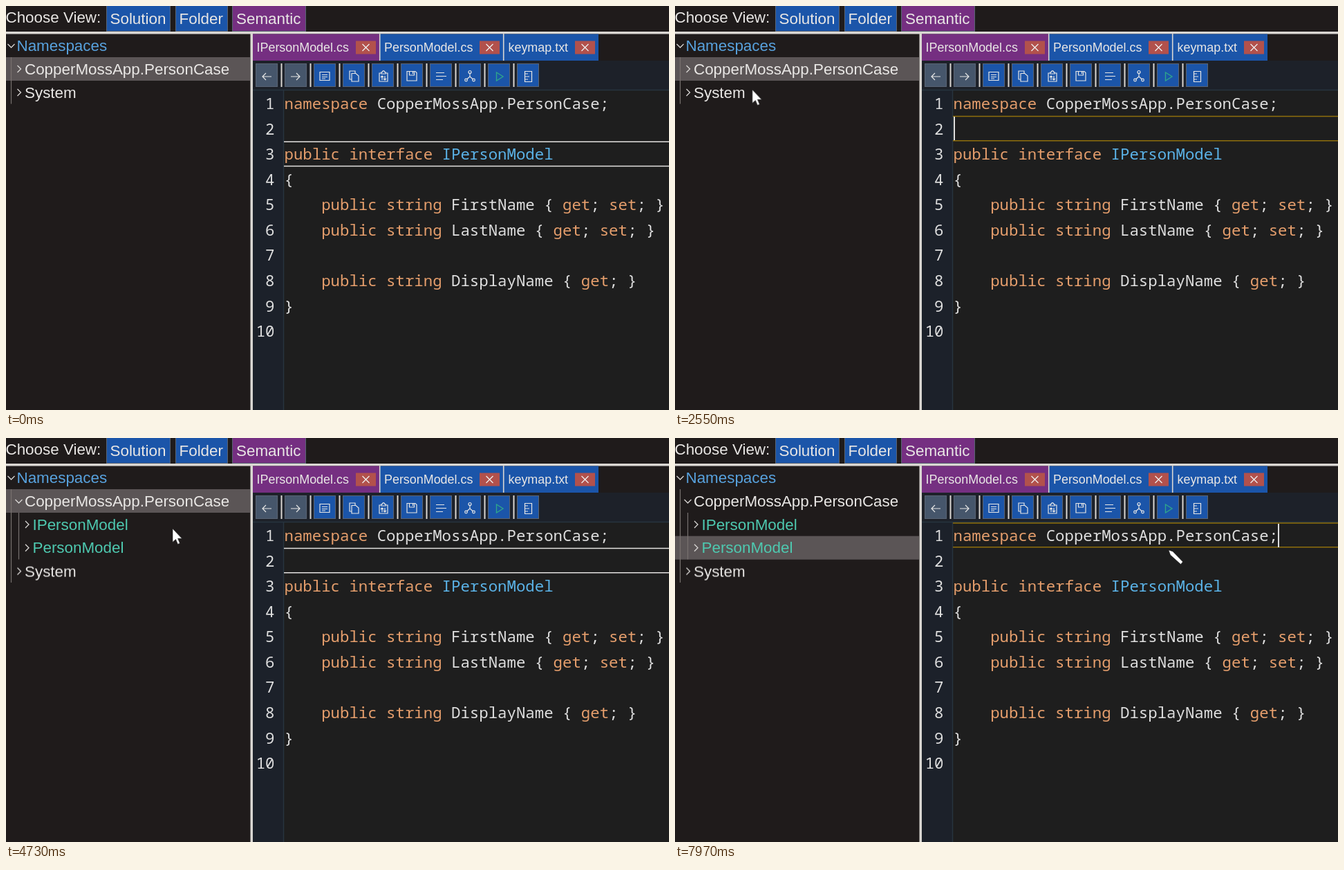
Write an HTML page that moves like this. It is 959 by 584 pixels and loops after 8000 ms.

```html
<!DOCTYPE html>
<html lang="en">
<head>
<meta charset="utf-8">
<title>Code explorer</title>
<style>
html, body { margin: 0; width: 100%; height: 100%; overflow: hidden; background: #1f1b1b; }
svg { display: block; }
text { font: 22.4px "Liberation Sans", Arial, sans-serif; fill: #e9e7e5; white-space: pre; }
.tab text { font-size: 17.92px; }
.code text { font: 22.37px "Noto Sans Mono", "DejaVu Sans Mono", monospace; fill: #dfdfdf; }
.num text { text-anchor: end; }
.code .k { fill: #e59e6c; }
.code .t { fill: #5bb3e8; }
.blue { fill: #1b55a9; }
.purple { fill: #752f81; }
.red { fill: #b2514c; }
.line { fill: none; stroke: #e4e2e0; stroke-width: 1.5; }
.guide { stroke: #77716f; stroke-width: 1.2; }
.type { fill: #4ec9b0; }

/* One loop is 8 s, so 1% is 80 ms. */
.a { animation: 8s step-end infinite; }
#closed { animation-name: closed; }
#opened { animation-name: opened; }
#system { animation-name: system; }
#row1 { animation-name: row1; }
#row2 { animation-name: row2; }
#row3 { animation-name: row3; }
#line1 { animation-name: line1; }
#line2 { animation-name: line2; }
#line3 { animation-name: line3; }
#caret { animation-name: caret; }
#pen { animation-name: pen; }
#arrow { animation-name: arrow; }
#hand { animation-name: hand; }
#ring { animation-name: ring; }
#mouse { animation: mouse 8s linear infinite; }

@keyframes closed { 0% { opacity: 1 } 42%, 100% { opacity: 0 } }
@keyframes opened { 0% { opacity: 0 } 42%, 100% { opacity: 1 } }
@keyframes system { 0% { transform: none } 42%, 100% { transform: translateY(67.6px) } }
@keyframes row1 { 0% { fill: #5b5556 } 38.5% { fill: #425b91 } 58.75% { fill: #5b5556 } 59.9%, 100% { fill: transparent } }
@keyframes row2 { 0% { fill: transparent } 59.9% { fill: #425b91 } 70.4% { fill: #5b5556 } 71.4%, 100% { fill: transparent } }
@keyframes row3 { 0% { fill: transparent } 71.4% { fill: #425b91 } 83.5%, 100% { fill: #5b5556 } }
@keyframes line1 { 0% { opacity: 0 } 83.5%, 100% { opacity: 1 } }
@keyframes line2 {
  0% { opacity: 0; stroke: #8f6f0c }
  15.9% { opacity: 1; stroke: #8f6f0c }
  38.5% { opacity: 1; stroke: #e4e2e0 }
  83.5%, 100% { opacity: 0 }
}
@keyframes line3 { 0% { opacity: 1 } 15.9%, 100% { opacity: 0 } }
@keyframes caret {
  0% { opacity: 0; transform: translate(403px, 160px) }
  15.9%, 51.2%, 63.8%, 76.3% { opacity: 1; transform: translate(403px, 160px) }
  45%, 57.5%, 70%, 82.5% { opacity: 0; transform: translate(403px, 160px) }
  83.5% { opacity: 1; transform: translate(564px, 124px) }
  94.5%, 100% { opacity: 1; transform: translate(872px, 124px) }
}
@keyframes pen { 0%, 75.6%, 100% { opacity: 1 } 20.9% { opacity: 0 } }
@keyframes arrow { 0%, 38.2%, 75.6%, 100% { opacity: 0 } 20.9%, 43.2% { opacity: 1 } }
@keyframes hand { 0%, 43.2%, 100% { opacity: 0 } 38.2% { opacity: 1 } }
@keyframes ring {
  0%, 17.5%, 42.9%, 61.4%, 73.6%, 84.2%, 96.2%, 100% { opacity: 0 }
  15.9%, 41.3%, 59.9%, 71.8%, 82.8%, 94.5% { opacity: 1 }
}
@keyframes mouse {
  0%, .7% { transform: translate(905px, 604px) }
  .9% { transform: translate(900px, 572px) }
  5% { transform: translate(760px, 330px) }
  8.6% { transform: translate(640px, 198px) }
  10.9% { transform: translate(592px, 238px) }
  14.6% { transform: translate(532px, 182px) }
  17%, 20.2% { transform: translate(515px, 177px) }
  21.6% { transform: translate(226px, 181px) }
  27.5%, 31.3% { transform: translate(121px, 123px) }
  37.5% { transform: translate(24px, 101px) }
  40%, 43% { transform: translate(22px, 102px) }
  47% { transform: translate(60px, 112px) }
  53% { transform: translate(170px, 128px) }
  58%, 61.8% { transform: translate(241px, 131px) }
  66%, 67.5% { transform: translate(228px, 145px) }
  70.5%, 73.6% { transform: translate(231.5px, 152px) }
  77.2% { transform: translate(460px, 160px) }
  81.5%, 86.5% { transform: translate(565px, 153px) }
  89.2% { transform: translate(530px, 152px) }
  93.8%, 96% { transform: translate(884px, 156px) }
  98.6% { transform: translate(878px, 159px) }
  99.5%, 100% { transform: translate(714px, 162px) }
}
</style>
</head>
<body>
<svg width="959" height="584" viewBox="0 0 959 584">
  <defs>
    <path id="right" d="M-2.5-5 2.5 0-2.5 5" fill="none" stroke="#d8d6d4" stroke-width="1.3"/>
    <path id="down" d="M-5-2.5 0 2.5 5-2.5" fill="none" stroke="#d8d6d4" stroke-width="1.3"/>
    <g id="close">
      <rect class="red" x="-14.5" y="-9.5" width="29" height="19"/>
      <path d="M-5-5 5 5M5-5-5 5" stroke="#eee" stroke-width="1.3"/>
    </g>
    <rect id="btn" x="-15.5" y="-16.5" width="31" height="33" stroke="#5a6474"/>
    <rect id="bar" x="397.5" y="83" width="2" height="34" fill="#d9d6d2"/>
  </defs>

  <rect width="959" height="584" fill="#1f1b1b"/>

  <!-- view chooser -->
  <text x="-.5" y="24">Choose View:</text>
  <g stroke="#5a6474">
    <rect class="blue" x="145.5" y="-.5" width="92" height="37"/>
    <rect class="blue" x="245.5" y="-.5" width="75" height="37"/>
    <rect class="purple" x="327.5" y="-.5" width="106" height="37"/>
  </g>
  <text x="150.5" y="26">Solution</text>
  <text x="250.5" y="26">Folder</text>
  <text x="333" y="26">Semantic</text>

  <!-- tree -->
  <g fill="transparent">
    <rect id="row1" class="a" y="74" width="353" height="34"/>
    <rect id="row2" class="a" y="108" width="353" height="33.7"/>
    <rect id="row3" class="a" y="141.7" width="353" height="34"/>
  </g>
  <use href="#down" x="7.5" y="57.5"/>
  <text x="15.5" y="65" style="fill:#58a2de">Namespaces</text>
  <text x="27" y="98.5">CopperMossApp.PersonCase</text>
  <g id="closed" class="a">
    <path class="guide" d="M7.5 74V141.5"/>
    <use href="#right" x="19" y="91"/>
  </g>
  <g id="opened" class="a">
    <path class="guide" d="M7.5 74V209M18.5 108V175.5"/>
    <use href="#down" x="18.5" y="91.5"/>
    <use href="#right" x="30.5" y="125"/>
    <use href="#right" x="30.5" y="158.7"/>
    <text class="type" x="38.5" y="132.5">IPersonModel</text>
    <text class="type" x="38.5" y="166.3">PersonModel</text>
  </g>
  <g id="system" class="a">
    <use href="#right" x="19" y="125"/>
    <text x="27" y="132.5">System</text>
  </g>

  <!-- editor panes -->
  <rect x="357" y="40" width="602" height="544" fill="#1e1e1e"/>
  <rect x="357" y="40" width="602" height="39" fill="#1f1b1b"/>
  <rect x="357" y="79" width="602" height="43" fill="#1d2129"/>
  <rect x="357" y="122" width="44" height="462" fill="#1c212a"/>
  <path d="M357 121.5H959M401.5 122V584" stroke="#27343f" stroke-width="1.5"/>
  <path d="M0 37H959V40.5H357V584H353.5V40.5H0Z" fill="#dad7d3"/>

  <!-- tabs -->
  <g class="tab">
    <rect class="purple" x="357" y="40.5" width="183" height="38.5"/>
    <rect class="blue" x="541" y="40.5" width="178" height="38.5"/>
    <rect class="blue" x="720" y="40.5" width="137" height="38.5"/>
    <path d="M540.7 40V79M719.7 40V79" stroke="#dad7d3" stroke-width="1.6"/>
    <text x="362.5" y="66">IPersonModel.cs</text>
    <text x="547" y="66">PersonModel.cs</text>
    <text x="726.5" y="66">keymap.txt</text>
    <use href="#close" x="520.5" y="60"/>
    <use href="#close" x="699.5" y="60"/>
    <use href="#close" x="837.5" y="60"/>
  </g>

  <!-- toolbar -->
  <g fill="#46566b">
    <use href="#btn" x="377" y="100"/><use href="#btn" x="419" y="100"/>
  </g>
  <g class="blue">
    <use href="#btn" x="461" y="100"/><use href="#btn" x="503" y="100"/>
    <use href="#btn" x="545" y="100"/><use href="#btn" x="587" y="100"/>
    <use href="#btn" x="629" y="100"/><use href="#btn" x="671" y="100"/>
    <use href="#btn" x="713" y="100"/><use href="#btn" x="755" y="100"/>
  </g>
  <use href="#bar"/><use href="#bar" x="42"/><use href="#bar" x="84"/>
  <use href="#bar" x="126"/><use href="#bar" x="168"/><use href="#bar" x="210"/>
  <use href="#bar" x="252"/><use href="#bar" x="294"/><use href="#bar" x="336"/>
  <g fill="none" stroke="#e6e6e6" stroke-width="1.2">
    <path d="M384 102H371M376 97 371 102 376 107"/>
    <path d="M412 102H425M420 97 425 102 420 107"/>
    <path d="M454 95.5H468V107.5H454ZM457 99.5H465M457 102.5H465M457 105H462"/>
    <path d="M500 97.5H506L510 101V109H500ZM500 106H497V94H505V97"/>
    <path d="M543 97H540V109H552V97H549M543 98V95.5H544.5C544.5 93 547.5 93 547.5 95.5H549V98ZM544 107V101M542 103 544 101 546 103M548 101V107M546 105 548 107 550 105"/>
    <path d="M580 94.5H592L594 96.5V108H580ZM583.5 95V100H590.5V95M588.5 95V98"/>
    <path d="M622 96.5H634M622 101.5H637M622 106.5H632"/>
    <path d="M671 97V102L666.5 106M671 102 675.5 106"/>
    <circle cx="671" cy="95.5" r="2"/><circle cx="665.5" cy="107" r="1.8"/><circle cx="676.5" cy="107" r="1.8"/>
    <path d="M709.5 96 719 102 709.5 108Z" stroke="#2fa58c" stroke-width="1.4"/>
    <path d="M750.5 94.5H760.5V109.5H750.5ZM751 98H755M751 102H757M751 106H755"/>
  </g>

  <!-- code -->
  <path id="line1" class="line a" d="M402 123H959M402 157.7H959" style="stroke:#8f6f0c"/>
  <path id="line2" class="line a" d="M402 159.5H959M402 194.7H959"/>
  <path id="line3" class="line a" d="M402 196.3H959M402 231.5H959"/>
  <g class="code num">
    <text x="388.5" y="149">1</text><text x="388.5" y="185.6">2</text>
    <text x="388.5" y="222.1">3</text><text x="388.5" y="258.7">4</text>
    <text x="388.5" y="295.3">5</text><text x="388.5" y="331.8">6</text>
    <text x="388.5" y="368.4">7</text><text x="388.5" y="404.9">8</text>
    <text x="388.5" y="441.5">9</text><text x="388.5" y="478">10</text>
  </g>
  <g class="code">
    <text x="402.5" y="149"><tspan class="k">namespace</tspan> CopperMossApp.PersonCase;</text>
    <text x="402.5" y="222.1"><tspan class="k">public interface</tspan> <tspan class="t">IPersonModel</tspan></text>
    <text x="402.5" y="258.7">{</text>
    <text x="402.5" y="295.3">    <tspan class="k">public string</tspan> FirstName { <tspan class="k">get</tspan>; <tspan class="k">set</tspan>; }</text>
    <text x="402.5" y="331.8">    <tspan class="k">public string</tspan> LastName { <tspan class="k">get</tspan>; <tspan class="k">set</tspan>; }</text>
    <text x="402.5" y="404.9">    <tspan class="k">public string</tspan> DisplayName { <tspan class="k">get</tspan>; }</text>
    <text x="402.5" y="441.5">}</text>
  </g>
  <rect id="caret" class="a" width="2" height="34" fill="#dedede"/>

  <!-- pointer -->
  <g id="mouse">
    <circle id="ring" class="a" cx="1" cy="3" r="9.5" fill="#a6a336"/>
    <path id="pen" class="a" d="M0 0 6 2 20.5 17 17.5 20.5 2.500 7Z" fill="#fff" stroke="#1e1e1e" stroke-width=".5"/>
    <path id="arrow" class="a" d="M0 0V19.5L4.5 15.5 7.5 22.5 10.5 21.2 7.6 14.3H13.5Z" fill="#fff" stroke="#222" stroke-width=".6"/>
    <path id="hand" class="a" d="M0 1C0-1 3.5-1 3.5 1V8C4-.2 7 6 7 8.5 8 7 10 7.5 10 9.5 11 8.5 12.5 9 12.5 11V16C12.5 18 11 19 11 22H2C1 19-4 15-6 12-6.5 10-4 9.5-2.5 11L0 13Z" fill="#fff" stroke="#222" stroke-width=".8"/>
  </g>
</svg>
</body>
</html>
```
